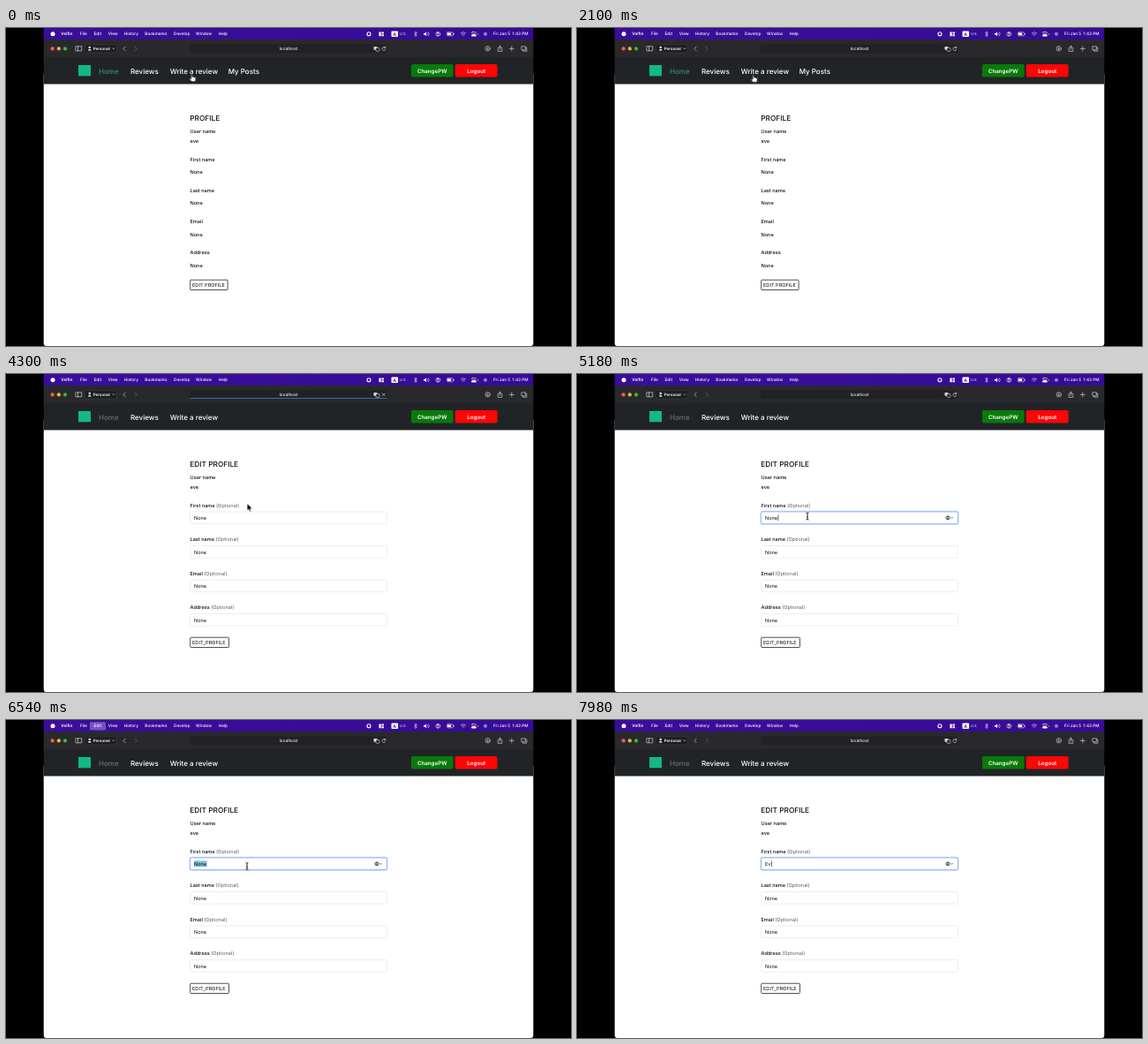
Animation, 640 px wide and 360 px high, one loop 8000 ms. Source, as an HTML page:

```html
<!DOCTYPE html>
<html lang="en">
<head>
<meta charset="utf-8">
<title>Profile editing</title>
<style>
html, body { margin: 0; width: 100%; height: 100%; overflow: hidden; background: #000; }
svg { display: block; width: 100vw; height: 100vh; font-family: Inter, "Open Sans", sans-serif; }
text { white-space: pre; text-rendering: geometricPrecision; }
.line { fill: none; stroke: #d8d8dc; stroke-width: .65; stroke-linecap: round; stroke-linejoin: round; }
.menu { font-size: 4.7px; font-weight: 500; fill: #fff; }
.menu .bold, .bold { font-weight: 600; }
.nav { font-size: 8px; fill: #fff; }
.body { font-size: 5.6px; fill: #0c0e13; }
.label { font-weight: 500; }
.title { font-size: 8.3px; font-weight: 500; }
.muted { font-weight: 400; fill: #5c5f65; }
.button { font-size: 5.6px; }
.frame { fill: #fff; stroke: #222; stroke-width: .8; }
.input { fill: #fff; stroke: #dfe2e6; stroke-width: .6; }

.timed { visibility: hidden; animation: 8s step-end infinite; }
.profile { animation-name: profile; }
.edit { animation-name: edit; }
.loading { animation-name: loading; }
.loaded { animation-name: loaded; }
.focus { animation-name: focused; }
.old-value { animation-name: old-value; }
.selected { animation-name: selected; }
.flash { animation-name: flash; }
.first { animation-name: first-key; }
.second { animation-name: second-key; }
.caret { animation-name: caret; }
.hand { animation-name: hand; }
.arrow { animation-name: arrow; }
.beam { animation-name: beam; }
.bar { transform-box: fill-box; transform-origin: left; animation: bar 8s linear infinite; }
.pointer { animation: move 8s ease-in-out infinite; }

@keyframes profile { 0% { visibility: visible } 47% { visibility: hidden } }
@keyframes edit { 47% { visibility: visible } }
@keyframes loading { 44% { visibility: visible } 55% { visibility: hidden } }
@keyframes loaded { 0% { visibility: visible } 44% { visibility: hidden } 55% { visibility: visible } }
@keyframes focused { 61% { visibility: visible } }
@keyframes old-value { 47% { visibility: visible } 91% { visibility: hidden } }
@keyframes selected { 80.5% { visibility: visible } 91% { visibility: hidden } }
@keyframes flash { 80.5% { visibility: visible } 83.5% { visibility: hidden } }
@keyframes first-key { 91% { visibility: visible } 96% { visibility: hidden } }
@keyframes second-key { 96% { visibility: visible } }
@keyframes caret {
  61% { visibility: visible } 68% { visibility: hidden }
  74% { visibility: visible } 80.5% { visibility: hidden }
}
@keyframes hand {
  0% { visibility: visible } 28% { visibility: hidden }
  36.5% { visibility: visible } 47% { visibility: hidden }
}
@keyframes arrow {
  28% { visibility: visible } 36.5% { visibility: hidden }
  47% { visibility: visible } 58% { visibility: hidden }
}
@keyframes beam { 58% { visibility: visible } 90% { visibility: hidden } }
@keyframes bar { 0%, 44% { transform: scaleX(.1) } 52%, 100% { transform: scaleX(1) } }
@keyframes move {
  0% { transform: translate(210.5px, 52px) }
  26.25%, 27.5% { transform: translate(199.7px, 52.8px) }
  37.5%, 46% { transform: translate(239.5px, 292.5px) }
  53%, 55.5% { transform: translate(273.3px, 146.7px) }
  60%, 69% { transform: translate(261px, 161px) }
  75%, 100% { transform: translate(273px, 165.5px) }
}
</style>
</head>
<body>
<svg viewBox="0 0 640 360" preserveAspectRatio="none">
  <defs>
    <linearGradient id="purple">
      <stop offset="0" stop-color="#3a0e9b"/>
      <stop offset="1" stop-color="#360b98"/>
    </linearGradient>
  </defs>
  <rect width="640" height="360"/>
  <rect x="42.7" y="50" width="554.6" height="310" rx="3" fill="#fff"/>
  <rect x="42.7" width="554.6" height="14" fill="url(#purple)"/>
  <rect x="42.7" y="13" width="554.6" height="20.5" fill="#29292c"/>
  <rect x="42.7" y="33" width="554.6" height="30.5" fill="#212427"/>

  <g id="menu" class="menu">
    <circle cx="53" cy="6.8" r="2.5"/>
    <rect class="timed flash" x="95" y="2.2" width="18" height="9.4" rx="1.5" fill="#7554c4"/>
  </g>

  <g id="status">
    <circle cx="411" cy="6.8" r="2" fill="none" stroke="#fff" stroke-width="1.1"/>
    <path d="M422.5 4.5h2.2v4.8h-2.2zM425.5 4.5h2.4v2h-2.4zM425.5 7.2h2.4v2.1h-2.4z" fill="#fff"/>
    <rect x="436.5" y="3.6" width="7.6" height="6.4" rx="1" fill="#fff"/>
    <text x="440.3" y="8.6" text-anchor="middle" font-size="5" class="bold" fill="#25105c">A</text>
    <text x="446" y="8.4" font-size="4" fill="#fff">U.S.</text>
    <path class="line" d="M462.6 5.2l2.8 3-1.4 1.4V4l1.4 1.4-2.8 3"/>
    <path d="M473 6h1.2l1.8-1.6v4.8l-1.8-1.6H473z" fill="#fff"/>
    <path class="line" d="M477.2 5.6q1 1.2 0 2.4M478.5 4.7q1.8 2.1 0 4.2"/>
    <circle class="line" cx="489.3" cy="6.8" r="2.5"/>
    <path d="M487.7 8.6q1.6-2.3 3.2 0zM488.3 5.8a1 1 0 1 1 2 0 1 1 0 1 1-2 0" fill="#fff"/>
    <rect class="line" x="499.5" y="4.8" width="7" height="4" rx="1"/>
    <path d="M500.2 5.5h4v2.6h-4zM507.2 6h.6v1.6h-.6z" fill="#fff"/>
    <path class="line" d="M515.2 5.8q2.8-2.5 5.6 0M516.4 7.2q1.6-1.4 3.2 0M517.9 8.6h.2"/>
    <rect class="line" x="527.5" y="4.4" width="5" height="1.9" rx=".9"/>
    <rect x="527.2" y="7.2" width="5.5" height="2.4" rx="1.2" fill="#fff"/>
    <circle cx="534.5" cy="7" r=".8" fill="#f59a23"/>
    <circle cx="543" cy="6.8" r="2.1" fill="#778bc8"/>
    <text class="menu" x="591.5" y="8.4" text-anchor="end">Fri Jan 5  1:43 PM</text>
  </g>

  <g id="toolbar">
    <circle cx="52.6" cy="23.4" r="2.1" fill="#f45d56"/>
    <circle cx="59.8" cy="23.4" r="2.1" fill="#e9b43a"/>
    <circle cx="67" cy="23.4" r="2.1" fill="#38b749"/>
    <path class="line" d="M79.3 20.8h6.4v5h-6.4zM81.5 20.8v5"/>
    <rect x="89.3" y="18.8" width="36" height="9.2" rx="2" fill="#1e1e20" stroke="#454549" stroke-width=".5"/>
    <path d="M92.6 25.6q2.1-3.8 4.2 0zM93.5 21.9a1.2 1.2 0 1 1 2.4 0 1.2 1.2 0 1 1-2.4 0" fill="#fff"/>
    <text class="bold" x="98.7" y="25" font-size="4.5" fill="#fff">Personal</text>
    <path class="line" d="M120.8 22.8l1.1 1.1 1.1-1.1M135 21.2l-2.1 2.2 2.1 2.2"/>
    <path class="line" d="M146.2 21.2l2.1 2.2-2.1 2.2" style="stroke:#6d6d70"/>
    <rect x="208" y="18.6" width="223.5" height="9.7" rx="2" fill="#222225"/>
    <text x="320" y="25" text-anchor="middle" font-size="4.75" font-weight="500" fill="#eee">localhost</text>
    <rect x="416.5" y="21" width="4" height="3.8" rx=".8" fill="#d8d8dc"/>
    <rect x="419" y="22.5" width="4" height="3.8" rx=".8" fill="#222225" stroke="#d8d8dc" stroke-width=".6"/>
    <path class="line timed loaded" d="M429.5 22.3a2 2 0 1 0 .4 1.8M429.8 21v1.5h-1.5"/>
    <g class="timed loading">
      <path class="line" d="M426.4 21.9l2.8 2.8m0-2.8l-2.8 2.8"/>
      <rect class="bar" x="209" y="27" width="222" height="1" fill="#3269cf"/>
    </g>
    <circle class="line" cx="545.7" cy="23.3" r="2.7"/>
    <path class="line" d="M545.7 21.8v2.8m-1.1-1.1l1.1 1.1 1.1-1.1M558 22.4h-.8v4h4.6v-4h-.8M559.5 24.3v-4m-1.3 1.2l1.3-1.2 1.3 1.2M570.3 23.4h5m-2.5-2.5v5M584.3 20.8h4v4h-4zM585.6 25v1.2h4.2v-4.1h-1.3"/>
  </g>

  <rect x="82" y="42" width="14" height="12.3" fill="#12b886"/>
  <g class="nav label">
    <text class="timed profile" x="105" y="51.6" fill="#348c74">Home</text>
    <text class="timed edit" x="105" y="51.6" fill="#6c6d70">Home</text>
    <text x="141" y="51.6">Reviews</text>
    <text x="185.7" y="51.6">Write a review</text>
    <text class="timed profile" x="251.7" y="51.6">My Posts</text>
  </g>
  <g class="bold" font-size="6.2" fill="#fff" text-anchor="middle">
    <rect x="459" y="41" width="47.5" height="14.5" rx="1.8" fill="#087a0a"/>
    <text x="482.7" y="50.5">ChangePW</text>
    <rect x="508.8" y="41" width="47.8" height="14.5" rx="1.8" fill="#fe0506"/>
    <text x="532.7" y="50.5">Logout</text>
  </g>

  <g class="body label">
    <text x="208.5" y="119.3">User name</text>
    <text x="208.5" y="129.9">eve</text>
  </g>
  <g id="profile" class="timed profile body">
    <text class="title" x="208.3" y="104.6">PROFILE</text>
    <rect class="frame" x="208.7" y="285.2" width="42.4" height="11.3" rx="1"/>
    <text class="button" x="211" y="293">EDIT PROFILE</text>
  </g>
  <g id="edit" class="timed edit body">
    <text class="title" x="208.3" y="104.6">EDIT PROFILE</text>
    <rect class="frame" x="208.7" y="298.2" width="43.8" height="11.3" rx="1"/>
    <text class="button" x="211" y="306">EDIT_PROFILE</text>
  </g>

  <g class="body">
    <g class="timed focus">
      <rect x="208.3" y="155.6" width="223.5" height="14.4" rx="2" fill="none" stroke="#c3d8fb" stroke-width="1.6"/>
      <rect x="208.7" y="156" width="222.7" height="13.6" rx="1.6" fill="#fff" stroke="#78a5ed" stroke-width=".7"/>
      <circle cx="420" cy="162.8" r="2" fill="none" stroke="#222" stroke-width=".8"/>
      <path d="M418.7 164.3q1.3-2 2.6 0zM419.2 162a.8.8 0 1 1 1.6 0 .8.8 0 1 1-1.6 0" fill="#222"/>
      <path class="line" d="M423.4 162.3l1.1 1.1 1.1-1.1" style="stroke:#333"/>
    </g>
    <rect class="timed selected" x="213" y="159.3" width="14.7" height="7" fill="#83bfdd"/>
    <text class="timed old-value" x="213" y="165.1">None</text>
    <text class="timed first" x="213" y="165.1">E</text>
    <text class="timed second" x="213" y="165.1">Ev</text>
    <g fill="#222">
      <rect class="timed caret" x="227.6" y="159.6" width=".7" height="6.6"/>
      <rect class="timed first" x="216.8" y="159.6" width=".7" height="6.6"/>
      <rect class="timed second" x="220.1" y="159.6" width=".7" height="6.6"/>
    </g>
  </g>

  <g class="pointer">
    <path class="timed hand" d="M-.9.4Q0-.5.8.4V3.3Q1.5 2.6 2.2 3.5 3 2.9 3.6 3.9 4.8 3.6 4.8 4.9L4.3 7.3 3.5 8.8H-.2L-2.8 5.6Q-3.1 4.5-2 4.7L-.9 5.5z" fill="#fff" stroke="#111" stroke-width=".8" stroke-linejoin="round"/>
    <path class="timed arrow" d="M0 0V7.8L1.8 6.2 3 8.9 4.3 8.4 3.1 5.6H5.5z" fill="#000" stroke="#fff" stroke-width=".4"/>
    <path class="timed beam" d="M-1.5-4Q0-4 0-3 0-4 1.5-4M0-3V3M-1.5 4Q0 4 0 3 0 4 1.5 4M-.8.9H.8" fill="none" stroke="#111" stroke-width=".9"/>
  </g>
</svg>
<script>
const add = (id, markup) => document.getElementById(id).insertAdjacentHTML("beforeend", markup);
const label = (x, y, text, cls = "") => `<text class="${cls}" x="${x}" y="${y}">${text}</text>`;

const menus = { Velfin: 62.3, File: 84, Edit: 99.5, View: 115.7, History: 133.8, Bookmarks: 157.3,
  Develop: 190, Window: 215, Help: 240.7 };
Object.entries(menus).forEach(([name, x], i) => add("menu", label(x, 8.4, name, i ? "" : "bold")));

["First name", "Last name", "Email", "Address"].forEach((name, i) => {
  const viewY = 150.8 + i * 35.2;
  add("profile", label(208.5, viewY, name, "label") + label(208.5, viewY + 14.3, "None", "label"));

  const formY = 150.8 + i * 38.5;
  add("edit", `<text class="label" x="208.5" y="${formY}">${name} <tspan class="muted">(Optional)</tspan></text>
    <rect class="input" x="208.7" y="${formY + 5.2}" width="222.7" height="13.6" rx="1.4"/>`);
  if (i) add("edit", label(213, formY + 14.3, "None"));
});
</script>
</body>
</html>
```
